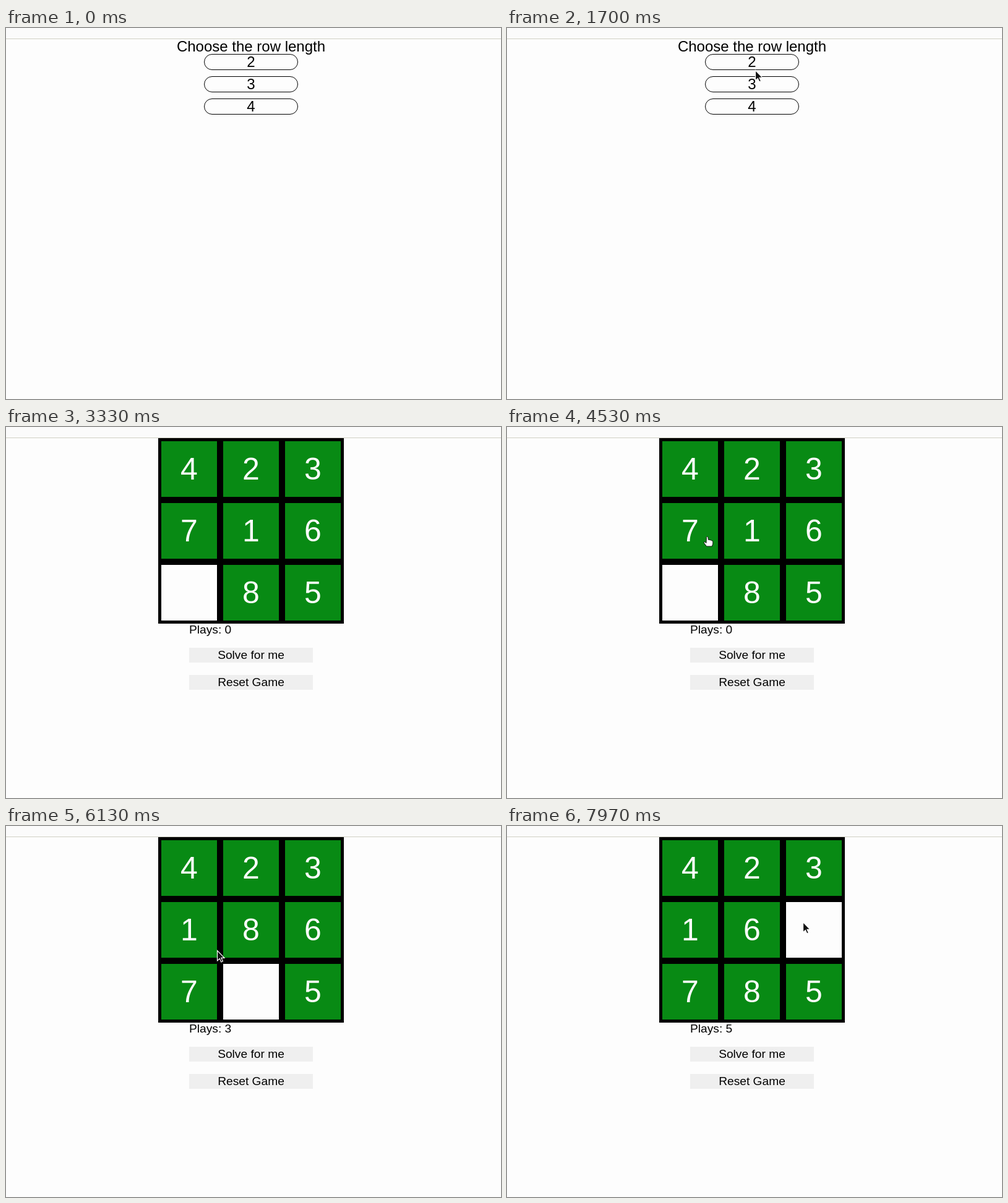
Animation of 800 by 600 pixels, one loop 8000 ms. Source, as an HTML page:

```html
<!DOCTYPE html>
<html lang="en">
<head>
<meta charset="utf-8">
<title>Sliding puzzle</title>
<style>
  html, body { margin: 0; width: 100%; height: 100%; overflow: hidden; }
  body { position: relative; background: #fdfdfd; color: #000; font: 19.2px/19.2px "Liberation Sans", Arial, sans-serif; cursor: default; }
  .bar { position: absolute; inset: 0 0 auto; height: 17px; background: #fbfbfb; border-bottom: 1px solid #d0d0c4; }
  .page { position: absolute; inset: 0; }
  .title { position: absolute; left: 196px; top: 18px; width: 400px; font-size: 24px; line-height: 24px; text-align: center; }
  .size { position: absolute; left: 320px; box-sizing: border-box; width: 152px; height: 26px; border: 1px solid #000; border-radius: 13px; font-size: 24px; line-height: 24px; text-align: center; }
  .board { position: absolute; left: 246px; top: 18px; width: 300px; height: 300px; background: #000; }
  .cell { position: absolute; width: 90px; height: 90px; background: #088a14; color: #fdfdfd; font-size: 50px; line-height: 90px; text-align: center; }
  .cell.blank { background: #fdfdfd; }
  .panel { position: absolute; left: 296px; top: 318px; width: 200px; }
  .done svg { position: absolute; left: 52px; top: 18px; }
  .button { margin-top: 20px; height: 24px; line-height: 24px; background: #efefef; text-align: center; }
  #cursor { position: absolute; left: 0; top: 0; overflow: visible; }
</style>
</head>
<body>
<div class="bar"></div>

<div class="page" id="menu">
  <div class="title">Choose the row length</div>
</div>

<div class="page" id="game">
  <div class="board" id="board"></div>
  <div class="panel">
    <div>Plays: <span id="plays">0</span></div>
    <div class="done" id="done">Done
      <svg width="23" height="21" viewBox="0 0 23 21">
        <circle cx="11.5" cy="10.5" r="10.2" fill="#fbc02d"/>
        <path d="M7.5 15.6q4.5 2.6 8-.6" fill="none" stroke="#6b4518" stroke-width="1.4" stroke-linecap="round"/>
        <path d="M.8 5.4q6-1.2 10.7.5q4.7-1.7 10.7-.5v1.7l-1.2.6q-.5 4.2-4.4 4.2q-3.4 0-4.1-3.9h-2q-.7 3.9-4.1 3.9q-3.9 0-4.4-4.2l-1.2-.6z" fill="#2c2c2e"/>
      </svg>
    </div>
    <div class="button">Solve for me</div>
    <div class="button">Reset Game</div>
  </div>
</div>

<svg id="cursor" width="20" height="20">
  <path id="arrow" d="M.5 .6V17L4.3 13.5L6.8 19L9.4 17.8L7 12.4H12Z" fill="#111" stroke="#fff" stroke-width="1.2"/>
  <path id="hand" d="M-.7 1.4Q-.7 .3 .6 .3Q1.8 .3 1.9 1.5L2.5 5.5Q4.2 4.2 5 6Q6.8 5 7.4 6.8Q9.8 6.3 9.8 8.7V12L8.3 16H-.5L-4.6 10.5Q-5.2 8.7-3.4 8.8L-1 10.5Z" fill="#fff" stroke="#111" stroke-width="1"/>
</svg>

<script>
const LOOP = 8000, GAME_AT = 2550, SHUFFLE_AT = 3000;
const SOLVED = [1, 2, 3, 4, 5, 6, 7, 8, 0];
const SHUFFLED = [4, 2, 3, 7, 1, 6, 0, 8, 5];

// Pointer visits: the pointer eases from one to the next
const at = (t, x, y) => ({ t, x, y });
const click = (t, x, y) => ({ t, x, y, click: true });
const VISITS = [
  [at(30, 682, 183), at(830, 402, 50), at(1450, 388, 115), at(1700, 401, 68),
   at(2500, 410, 90), at(2630, 412, 81), at(3290, 800, 400)],
  [at(3370, 562, 390), at(4130, 270, 165), at(4530, 323, 177),
   click(4770, 312, 172), click(5230, 392, 166), click(5900, 394, 255),
   at(6130, 341, 201), at(6670, 340, 260),
   click(7270, 402, 180), click(7800, 480, 158), at(LOOP, 478, 155)]
];

const el = id => document.getElementById(id);
const show = (node, on) => { node.style.display = on ? "" : "none"; };
const inside = (x, y, left, top, w, h) => x >= left && x < left + w && y >= top && y < top + h;
const colOf = i => i % 3, rowOf = i => Math.floor(i / 3);
const sizeTop = n => 42 + (n - 2) * 36;

function add(parent, name, left, top, text = "") {
  const node = document.createElement("div");
  node.className = name;
  node.textContent = text;
  if (left !== null) node.style.left = left + "px";
  node.style.top = top + "px";
  return parent.appendChild(node);
}

for (const n of [2, 3, 4]) add(el("menu"), "size", null, sizeTop(n), n);
const cells = SOLVED.map((_, i) => add(el("board"), "cell", 5 + colOf(i) * 100, 5 + rowOf(i) * 100));

// Index of the tile under the pointer if it borders the gap, else -1
function movable(x, y, tiles) {
  const gap = tiles.indexOf(0);
  return tiles.findIndex((_, i) =>
    Math.abs(colOf(i) - colOf(gap)) + Math.abs(rowOf(i) - rowOf(gap)) === 1 &&
    inside(x, y, 251 + colOf(i) * 100, 23 + rowOf(i) * 100, 90, 90));
}

function boardAt(t) {
  const tiles = [...(t < SHUFFLE_AT ? SOLVED : SHUFFLED)];
  const clicks = VISITS.flat().filter(v => v.click && v.t <= t);
  for (const { x, y } of clicks) {
    const from = movable(x, y, tiles);
    tiles[tiles.indexOf(0)] = tiles[from];
    tiles[from] = 0;
  }
  return { tiles, plays: clicks.length };
}

function pointerAt(t) {
  for (const path of VISITS) {
    const i = path.findIndex(v => v.t > t);
    if (i < 1) continue;
    const a = path[i - 1], b = path[i];
    const u = (t - a.t) / (b.t - a.t), k = u * u * (3 - 2 * u);
    return [Math.round(a.x + (b.x - a.x) * k), Math.round(a.y + (b.y - a.y) * k)];
  }
  return null;
}

function clickable(x, y, t, tiles) {
  if (t < GAME_AT) return [2, 3, 4].some(n => inside(x, y, 320, sizeTop(n), 152, 26));
  const top = t < SHUFFLE_AT ? 376 : 357;
  return [top, top + 44].some(y0 => inside(x, y, 296, y0, 200, 24)) || movable(x, y, tiles) >= 0;
}

function draw(t) {
  const { tiles, plays } = boardAt(t);
  show(el("menu"), t < GAME_AT);
  show(el("game"), t >= GAME_AT);
  show(el("done"), t < SHUFFLE_AT);
  el("plays").textContent = plays;
  cells.forEach((cell, i) => {
    cell.textContent = tiles[i] || "";
    cell.classList.toggle("blank", !tiles[i]);
  });

  const tip = pointerAt(t);
  show(el("cursor"), tip);
  if (!tip) return;
  const hand = clickable(...tip, t, tiles);
  el("cursor").style.transform = `translate(${tip[0]}px, ${tip[1]}px)`;
  show(el("hand"), hand);
  show(el("arrow"), !hand);
}

const start = performance.now();
function tick() {
  draw((performance.now() - start) % LOOP);
  requestAnimationFrame(tick);
}
draw(0);
requestAnimationFrame(tick);
</script>
</body>
</html>
```
